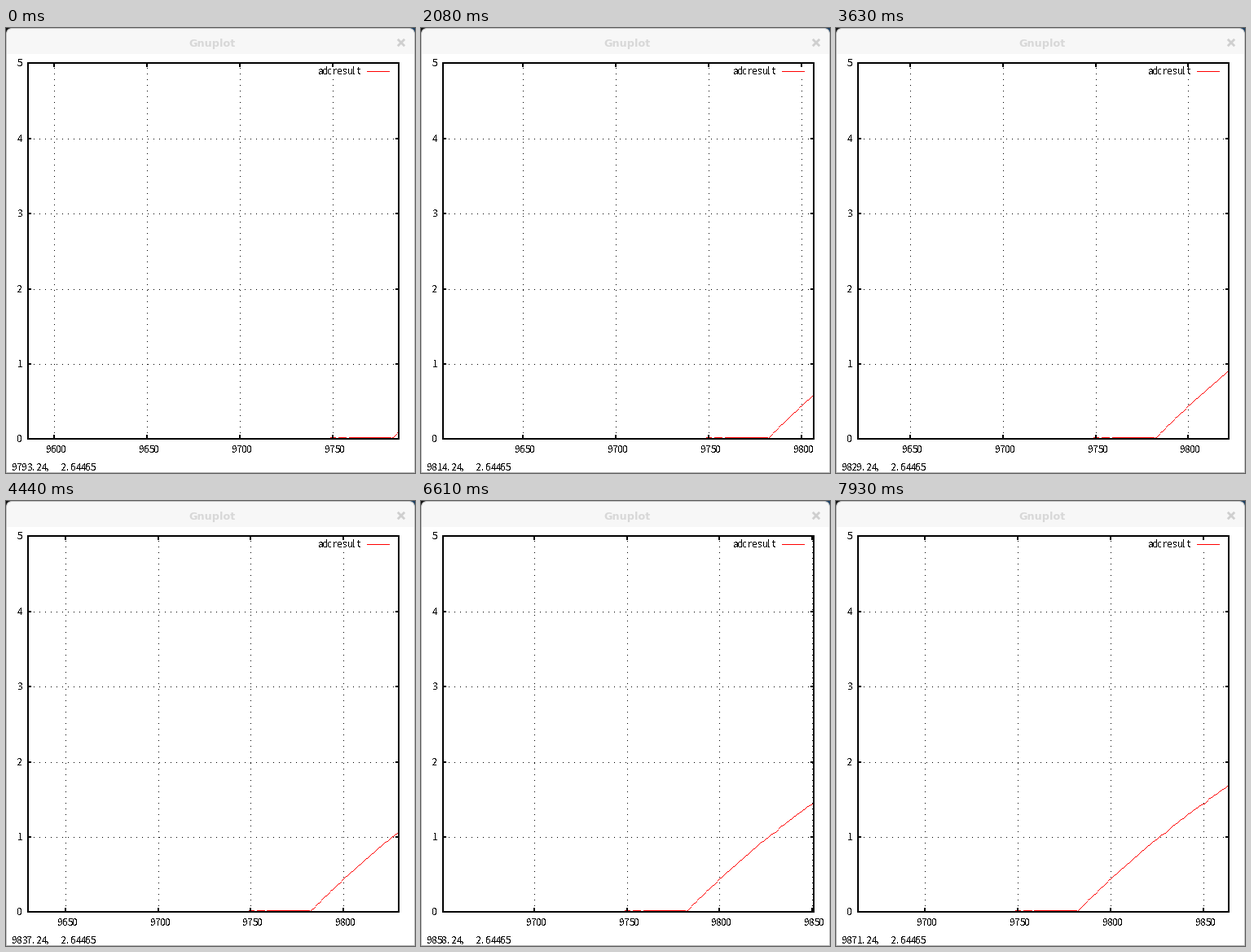
A matplotlib script for the animation above (8 s loop, 502 by 547 pixels).

```python
import numpy as np
import matplotlib.pyplot as plt
from matplotlib.animation import FuncAnimation
from matplotlib.patches import FancyBboxPatch, Rectangle

W, H, DPI = 502, 547, 64
PX = 72 / DPI                    # one pixel in points
LOOP, STEP = 8000, 20            # ms

LEFT, RIGHT, TOP, BOTTOM = 27, 482, 43, 505
ORIGIN, SCALE = 27.66, 2.2765    # sample number to pixels
SPAN = 200                       # samples across the plot
FIRST = 9586                     # left end of the x range at the start
RISE = 9782                      # sample where charging begins
RED = "#ff0000"

# bursts of new samples: first time, last time, count
BURSTS = [(60, 840, 9), (960, 1140, 3), (1250, 1750, 6), (1870, 2580, 8),
          (2700, 3410, 8), (3510, 4240, 8), (4340, 5050, 8), (5160, 5890, 8),
          (5990, 6710, 8), (6800, 7520, 8), (7630, 7930, 4)]
sample_ms = np.concatenate([np.linspace(*b) for b in BURSTS])

fig = plt.figure(figsize=(W / DPI, H / DPI), dpi=DPI, facecolor="#101010")
ax = fig.add_axes([0, 0, 1, 1])
ax.set_xlim(0, W)
ax.set_ylim(H, 0)
ax.axis("off")


def line(xs, ys, color="black", width=1, z=3, **kw):
    return ax.plot(xs, ys, color=color, lw=width * PX, zorder=z, snap=False,
                   solid_capstyle="butt", dash_capstyle="butt", **kw)[0]


def box(x, y, w, h, color, z):
    ax.add_patch(Rectangle((x, y), w, h, fc=color, ec="none", lw=0, zorder=z))


def dotted(xs, ys):
    return line(xs, ys, z=2, ls=(0, (1, 6)))


def segments(parts):
    """Join separate (x0, y0, x1, y1) strokes into one broken line."""
    xs, ys = [], []
    for x0, y0, x1, y1 in parts:
        xs += [x0, x1, np.nan]
        ys += [y0, y1, np.nan]
    return xs, ys


class Cells:
    """Text on a fixed grid of 6 pixel wide cells."""

    def __init__(self, count):
        self.chars = [ax.text(0, 0, "", family="Noto Sans CJK JP",
                              size=12 * PX, ha="left", va="baseline",
                              antialiased=False, zorder=8)
                      for _ in range(count)]

    def put(self, x, y, s):
        for i, t in enumerate(self.chars):
            t.set_text(s[i].strip() if i < len(s) else "")
            t.set_position((x + 6 * i - 0.2, y))


def to_x(k, left):
    return np.floor(ORIGIN + (k - left) * SCALE)


def to_y(v):
    return BOTTOM - np.floor(v * (BOTTOM - TOP) / 5)


def voltage(k):
    v = 0.015 + 5 * (1 - np.exp(-(k - RISE) / 200))
    for dip in (9830, 9851):
        v = v - 0.015 * np.exp(-((k - dip) / 1.5) ** 2)
    return v


# window frame
box(W - 12, 0, 12, 12, "#1b3f63", 0)
ax.add_patch(FancyBboxPatch((0.5, 0.5), W - 1, H + 20, fc="#f7f7f7",
                            ec="#c4c4c4", lw=PX, zorder=0.5,
                            boxstyle="round,pad=0,rounding_size=7"))
box(1, 32, W - 2, H - 33, "white", 1)
box(0, H - 1, W, 1, "#b4b4b4", 1)
ax.text(252.7, 23, "Gnuplot", family="DejaVu Sans", weight="bold",
        size=12.7 * PX, color="#d8d8d8", ha="center", va="baseline", zorder=3)
for dy in (4.2, -4.2):
    line([480.8, 489.2], [18 - dy, 18 + dy], "#cfcfcf", 2.8)

# static plot parts
for v in range(6):
    y = to_y(v)
    Cells(1).put(14, y + 4, str(v))
    if 0 < v < 5:
        dotted([LEFT, RIGHT], [y + 0.5, y + 0.5])
        line(*segments([(LEFT, y, LEFT + 4, y), (RIGHT - 4, y, RIGHT, y)]),
             width=2, z=6)
line([LEFT, RIGHT, RIGHT, LEFT, LEFT, LEFT + 1],
     [TOP, TOP, BOTTOM, BOTTOM, TOP, TOP],
     width=2, z=6, solid_joinstyle="miter")
box(376, 48, 100, 12, "white", 2.5)
Cells(9).put(383, 57, "adcresult")
line([443, 471], [53.5, 53.5], RED, z=4)

# moving parts
grid = [dotted([], []) for _ in range(5)]
marks = line([], [], width=2, z=6)
labels = [Cells(4) for _ in range(5)]
flat = line([], [], RED, z=4)
curve = line([], [], RED, z=5)
cursor = Cells(17)


def update(i):
    n = int(np.sum(sample_ms <= i * STEP + STEP / 2))
    left = FIRST + n

    majors = list(range(-(-left // 50) * 50, left + SPAN + 1, 50))
    strokes = []
    for j in range(5):
        if j < len(majors):
            x = to_x(majors[j], left)
            grid[j].set_data([x + 0.5, x + 0.5], [BOTTOM, TOP])
            labels[j].put(x - 9, 522, str(majors[j]))
            strokes += [(x, BOTTOM, x, BOTTOM - 5), (x, TOP, x, TOP + 5)]
        else:
            grid[j].set_data([], [])
            labels[j].put(0, 0, "")
    marks.set_data(*segments(strokes))

    base = BOTTOM - 1.5
    flat.set_data(*segments(
        (to_x(a, left), base, to_x(b, left), base)
        for a, b in ((9748.8, 9752), (9753.3, 9757.8), (9758.8, RISE))))

    # one whole pixel per column
    k = np.arange(RISE, left + SPAN)
    xs = to_x(k, left)
    cols = np.arange(xs[0], xs[-1] + 1)
    rows = np.floor(np.interp(cols, xs, to_y(voltage(k))) + 0.5) + 0.5
    curve.set_data(*segments(zip(cols, rows, cols + 1, rows)))
    cursor.put(8, 544, f"{9793.24 + n:.2f},  2.64465")
    return []


anim = FuncAnimation(fig, update, frames=LOOP // STEP, interval=STEP,
                     repeat=True, repeat_delay=0, blit=False)
plt.show()
```
